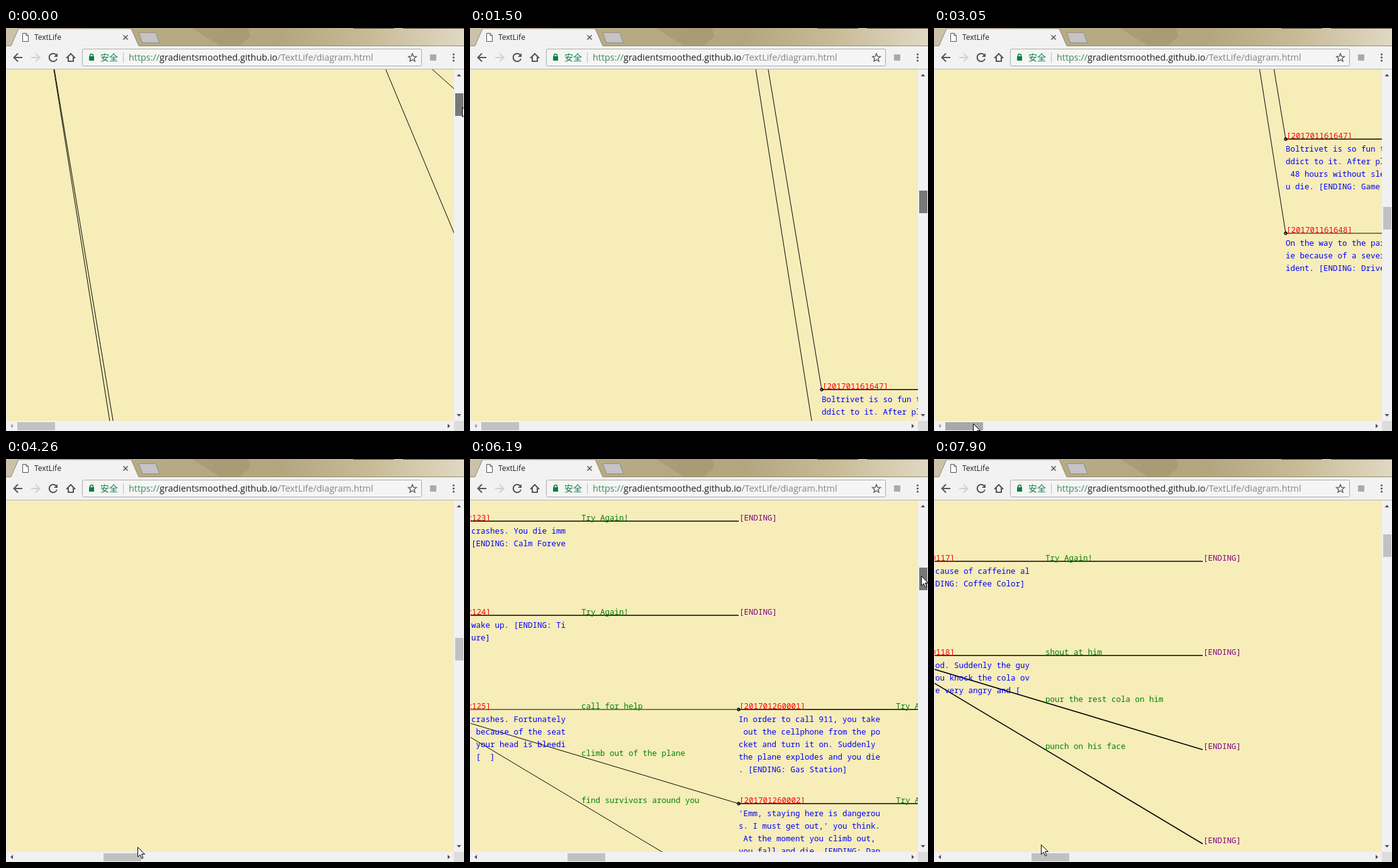
Animation, 728 px wide and 642 px high, one loop 8000 ms. Source, as an HTML page:

```html
<!DOCTYPE html>
<html lang="en">
<head>
<meta charset="utf-8">
<title>TextLife</title>
<style>
  html, body { margin: 0; width: 100%; height: 100%; overflow: hidden; background: #f2f2f2; }
  svg { display: block; }
  #page text { font: 12.5px "Noto Sans Mono", "Liberation Mono", monospace; white-space: pre; }
  .label { font: 12px "Open Sans", sans-serif; fill: #222; }
  .url { font: 14.4px "Open Sans", sans-serif; fill: #858585; }
  .safe { font: 14px "Noto Sans CJK SC", "Noto Sans CJK", sans-serif; fill: #0b8043; }
  .icon { fill: none; stroke: #555; stroke-width: 2; }
</style>
</head>
<body>
<svg id="stage" width="728" height="642" viewBox="0 0 728 642">
  <defs>
    <linearGradient id="sky">
      <stop offset="0" stop-color="#cbc3aa"/>
      <stop offset=".2" stop-color="#b8ac86"/>
      <stop offset=".6" stop-color="#b3a67f"/>
      <stop offset=".8" stop-color="#c8bc98"/>
      <stop offset="1" stop-color="#e0d8c2"/>
    </linearGradient>
    <clipPath id="view"><rect x="1" y="66" width="711" height="560"/></clipPath>
  </defs>

  <rect width="728" height="28" fill="url(#sky)"/>
  <path d="M296 0H385L388 14L372 28H340Z" fill="#a2956f" opacity=".6"/>
  <path d="M552 0H617M631 0H728" stroke="#4a3f35" stroke-width="2"/>
  <rect y="28" width="728" height="38" fill="#f2f2f2"/>
  <path d="M0 28.5H8L20 1H199L211 28.5H728" fill="#f2f2f2" stroke="#948a6d"/>
  <path d="M9 28.5H210" stroke="#f2f2f2" stroke-width="2"/>
  <path d="M211 7.5H238L244 23.5H217Z" fill="#c5c3c5" stroke="#94908a" stroke-linejoin="round"/>
  <path d="M26.5 8.5H32L35.5 12V21.5H26.5ZM32 8.5V12H35.5" fill="#fff" stroke="#505050"/>
  <text class="label" x="45" y="19">TextLife</text>

  <g id="toolbar">
    <path class="icon" d="M81 45A6.3 6.3 0 1 0 81 49"/>
    <path d="M82 40V46H76Z" fill="#555"/>
    <path class="icon" d="M96 48L103 41L110 48M99 46V53H107V46"/>
    <rect x="121.5" y="33.5" width="539" height="27" rx="2" fill="#f5f5f5" stroke="#a9a9a9"/>
    <rect x="132" y="45" width="8" height="7" fill="#0b8043"/>
    <rect x="133.500" y="41.500" width="5" height="7" rx="2.500" fill="none" stroke="#0b8043" stroke-width="1.5"/>
    <text class="safe" x="150" y="52">安全</text>
    <path d="M186.5 39V55" stroke="#bbb"/>
    <text class="url" x="195" y="52"><tspan fill="#3a8a5c">https://</tspan><tspan fill="#222">gradientsmoothed.github.io</tspan>/TextLife/diagram.html</text>
    <rect x="674" y="42" width="10" height="10" fill="#aaa"/>
  </g>
  <path d="M0 65.5H728" stroke="#b8b6ae"/>

  <rect y="66" width="728" height="576" fill="#f1f1f1"/>
  <rect x="1" y="66" width="711" height="560" fill="#f6edb9"/>
  <g clip-path="url(#view)"><g id="page"></g></g>
  <rect x="712" y="626" width="16" height="16" fill="#dcdcdc"/>
  <g id="bars"></g>
  <rect id="vThumb" x="714" width="13" height="36"/>
  <rect id="hThumb" y="628" width="60" height="13"/>
  <path id="cursor" d="M.5 .5V16L4 12.5L7 18.5L9 17.5L6.500 11.500H11.500Z" fill="#fff" stroke="#000"/>
</svg>
<script>
const LOOP = 8000, STEP = 125, ROW = 150, COL = 500, LEFT = 59;
const $ = id => document.getElementById(id);

function add(parent, tag, attrs, text = '') {
  const el = document.createElementNS('http://www.w3.org/2000/svg', tag);
  for (const key in attrs) el.setAttribute(key, attrs[key]);
  el.textContent = text;
  $(parent).append(el);
  return el;
}

// Browser icons
const icon = (d, x, y, turn = 0, stroke = '#555') => add('toolbar', 'path',
  { class: 'icon', d, transform: `translate(${x} ${y}) rotate(${turn})`, style: `stroke:${stroke}` });
const ARROW = 'M7 0H-6M0 -6.500L-6.500 0L0 6.500';
icon(ARROW, 19, 47);
icon(ARROW, 47, 47, 180, '#d0d0d0');
icon('M-3.5 -3.5L3.5 3.5M3.5 -3.5L-3.5 3.5', 190, 15).style.strokeWidth = 1.6;
const star = Array.from({ length: 10 }, (_, i) => {
  const r = i % 2 ? 3 : 6.8, a = i * Math.PI / 5;
  return [r * Math.sin(a), -r * Math.cos(a)];
});
icon(`M${star.join('L')}Z`, 646, 47.5).style.strokeWidth = 1.3;
for (const y of [42, 47, 52]) add('toolbar', 'circle', { cx: 711.5, cy: y, r: 1.6, fill: '#555' });

const barArrow = (x, y, turn) => add('bars', 'path',
  { d: 'M-3.5 2H3.5L0 -2Z', fill: '#505050', transform: `translate(${x} ${y}) rotate(${turn})` });
barArrow(720, 75, 0);
barArrow(720, 617, 180);
barArrow(704, 634, 90);
const leftArrow = barArrow(9, 634, -90);

// Story diagram
const colX = col => LEFT + col * COL;
const write = (x, y, fill, text) => add('page', 'text', { x, y, fill }, text);

// An edge carries its choice at the midpoint.
function edge(col, from, to, label, width = 1) {
  const x = colX(col), y1 = from * ROW, y2 = to * ROW;
  add('page', 'line', { x1: x, y1, x2: x + COL, y2, stroke: '#000', 'stroke-width': width });
  write(x + COL / 2, (y1 + y2) / 2 - 1, 'green', label);
}
function ending(col, from, to = from, label = 'Try Again!') {
  edge(col, from, to, label, 1.6);
  write(colX(col + 1) + 1, to * ROW - 1, 'purple', '[ENDING]');
}
function node(col, row, id, story = '') {
  const x = colX(col), y = row * ROW;
  add('page', 'circle', { cx: x, cy: y, r: 2, fill: 'none', stroke: '#000', 'stroke-width': 1.3 });
  write(x + 1, y - 1, 'red', `[${id}]`);
  (story.match(/.{1,30}/g) || []).forEach((line, i) => write(x, y + 19.5 + i * 20, 'blue', line));
}

edge(0, 0, 20, 'play video games');
edge(0, 0, 21, 'go to the party');
edge(1, 0, 3, '');
edge(1, 0, 8, '');
edge(1, 21, 21, 'Try Again!');
ending(1, 20);
ending(3, 3);
['shout at him', 'pour the rest cola on him', 'punch on his face'].forEach((label, i) => ending(3, 4, 4 + i, label));
ending(3, 8);
ending(3, 9);
['call for help', 'climb out of the plane', 'find survivors around you'].forEach((label, i) => {
  edge(3, 10, 10 + i, label);
  ending(4, 10 + i);
});

node(1, 20, '201701161647', 'Boltrivet is so fun that you addict to it. After playing for 48 hours without sleeping, you die. [ENDING: Game Addict]');
node(1, 21, '201701161648', 'On the way to the party, you die because of a severe car accident. [ENDING: Drive Safely]');
node(3, 3, '201701250117', 'You die because of caffeine allergy. [ENDING: Coffee Color]');
node(3, 4, '201701250118', "It's so good. Suddenly the guy next to you knock the cola over. You are very angry and [");
node(3, 7, '201701250119');
node(3, 8, '201701252123', 'The plane crashes. You die immediately. [ENDING: Calm Forever]');
node(3, 9, '201701252124', 'You never wake up. [ENDING: Tired Adventure]');
node(3, 10, '201701252125', 'The plane crashes. Fortunately, you live because of the seat belt. But your head is bleeding so soon [  ]');
node(4, 10, '201701260001', 'In order to call 911, you take out the cellphone from the pocket and turn it on. Suddenly the plane explodes and you die. [ENDING: Gas Station]');
node(4, 11, '201701260002', "'Emm, staying here is dangerous. I must get out,' you think. At the moment you climb out, you fall and die. [ENDING: Dangerous Climb]");
node(4, 12, '201701260003', 'You find nobody around you. You die alone. [ENDING: Lonely]');

// Motion
const ramp = (t, from, to, power = 1) => Math.min(1, Math.max(0, (t - from) / (to - from))) ** power;
const within = (t, from, to) => t >= from && t < to;

const scrollAt = t => 41 + 2919 * ramp(t, 0, 1703, 1.6) - 137 * ramp(t, 2000, 2200)
  - 1722 * ramp(t, 5500, 6125, .7) - 476 * ramp(t, 6125, 6625) - 338 * ramp(t, 6625, 7250, .8);
const panAt = t => 18 + 167 * ramp(t, 3125, 3600) - 30 * ramp(t, 3600, 3875);

// Free pointer path between scrollbar drags: time, x, y
const WAYPOINTS = [[2000, 735, 330], [2375, 240, 592], [2875, 62, 630], [3125, 62, 630],
  [3500, 200, 650], [4125, 209, 650], [4250, 209, 618], [4500, 481, 459], [5125, 717, 290],
  [7250, 717, 133], [7875, 170, 614]];

function pointerAt(t, thumb) {
  if (t < 2000) return [725 + t / 60, thumb + 22];
  if (within(t, 5500, 7251)) return [717, thumb + 13];
  const next = WAYPOINTS.findIndex(point => point[0] > t);
  if (next < 0) return WAYPOINTS.at(-1).slice(1);
  const [t0, x0, y0] = WAYPOINTS[next - 1], [t1, x1, y1] = WAYPOINTS[next];
  const u = ramp(t, t0, t1);
  return [x0 + (x1 - x0) * u, y0 + (y1 - y0) * u];
}
const shade = (pressed, hover) => pressed ? '#787878' : hover ? '#a8a8a8' : '#c1c1c1';
const set = (id, attrs) => Object.entries(attrs).forEach(([key, value]) => $(id).setAttribute(key, value));

function render(time) {
  const t = Math.floor((time + 5) / STEP) * STEP;
  const scroll = Math.round(scrollAt(t)), pan = panAt(t);
  const thumb = Math.round(scroll / 15.37 + 101.33);
  const panX = Math.round((pan - 18) * 1632 / 137);
  const [x, y] = pointerAt(t, thumb).map(Math.round);

  set('page', { transform: `translate(${-panX} ${-scroll})` });
  set('vThumb', { y: thumb, fill: shade(t < 2300 || within(t, 5500, 7400), within(t, 5100, 5500)) });
  set('hThumb', { x: Math.round(pan), fill: shade(within(t, 3100, 4200), within(t, 2800, 3100)) });
  set('cursor', { transform: `translate(${x} ${y})` });
  leftArrow.setAttribute('fill', panX ? '#505050' : '#a3a3a3');
}

const start = performance.now();
function frame() {
  render((performance.now() - start) % LOOP);
  requestAnimationFrame(frame);
}
frame();
</script>
</body>
</html>
```
